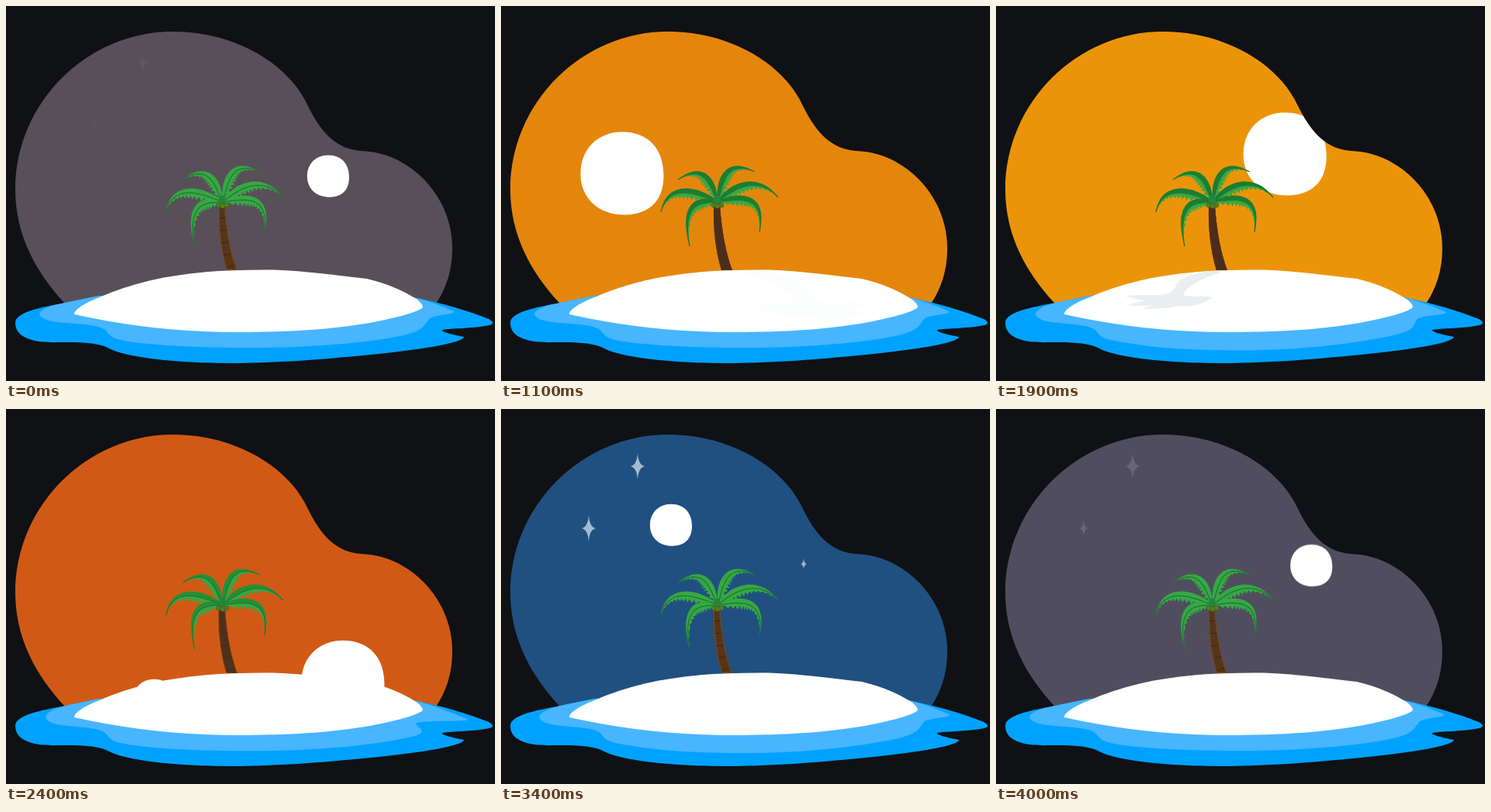
An HTML page for the animation above (4100 ms loop, 630 by 484 pixels).

```html
<!DOCTYPE html>
<html lang="en">
<head>
<meta charset="utf-8">
<title>Island day and night</title>
<style>
  html, body { margin: 0; width: 100%; height: 100%; overflow: hidden; background: #0f1114; }
  svg { display: block; width: 630px; height: 484px; }
</style>
</head>
<body>
<svg viewBox="0 0 630 484">
  <defs>
    <path id="blob" d="M76 384C30 335 12 285 12 237C12 125 104 33 215 33C290 33 357 70 385 121C400 152 418 184 457 187C522 189 575 246 575 313C575 341 567 365 554 384Z"/>
    <path id="sea" d="M12 409C12 395 45 389 76 383Q100 378 120 374L300 360L525 376C560 383 595 393 622 404Q634 411 617 413C600 416 575 416 562 418Q560 421 590 427C589 436 520 445 470 450C400 457 340 461 290 461C230 461 160 455 135 443C120 434 95 434 70 434C45 435 12 432 12 409Z"/>
    <path id="disc" d="M-1-53.5C35-54 53.5-30 53.5 2C54 38 32 53 4 53.5C-32 54-54 30-53.5 0C-53-33-30-53-1-53.5Z"/>
    <path id="star" d="M0-17Q1-2 9 0Q1 2 0 17Q-1 2-9 0Q-1-2 0-17Z"/>
    <path id="trunk" d="M274 258Q273 305 284 341H298Q286 310 282 258Z"/>
    <clipPath id="inSky"><use href="#blob"/></clipPath>
    <clipPath id="inSea"><use href="#sea"/></clipPath>
    <clipPath id="inTrunk"><use href="#trunk"/></clipPath>
    <clipPath id="inSand"><use href="#sand"/></clipPath>
  </defs>
  <use href="#blob" id="sky"/>
  <g id="stars" fill="#d9e6ee">
    <use href="#star" x="176" y="74"/><use href="#star" x="113" y="154"/><use href="#star" x="390" y="200"/>
  </g>
  <g clip-path="url(#inSky)" fill="#fff">
    <use href="#disc" id="sun"/>
    <use href="#disc" id="moon"/>
  </g>
  <use href="#trunk" fill="#563519"/>
  <g clip-path="url(#inTrunk)" fill="none">
    <path id="rings" stroke="#3d2512"/>
    <use href="#trunk" stroke="#7a4c1c" stroke-width="2"/>
  </g>
  <use href="#trunk" fill="#4a2c1c" id="dayTrunk"/>
  <path id="leaves" fill="#36a844"/>
  <path id="ribs" fill="none" stroke="#1c7832" stroke-width="1.3"/>
  <path id="shade" fill="#1e7c30"/>
  <ellipse cx="278.5" cy="251" rx="4.5" ry="7" fill="#24863a"/>
  <g fill="#557f1e" stroke="#375a18" stroke-width=".6">
    <circle cx="274" cy="257" r="3"/><circle cx="284" cy="257" r="3"/><circle cx="279" cy="258" r="3.3"/>
  </g>
  <use href="#sea" fill="#00a2ff"/>
  <path id="shallows" fill="#48b5ff" clip-path="url(#inSea)"/>
  <path id="sand" fill="#fff" d="M88 398C87 393 100 384 118 377C190 344 270 340 345 340.5C385 342 430 348 465 352C495 359 518 371 530 379Q536 384 537 388C537 391 525 396 505 401C440 418 360 421 298 421C230 421 160 414 88 398Z"/>
  <g clip-path="url(#inSand)">
    <path id="shadow" fill="#eaeef0" d="M0 0C-26 2-48 8-54 18C-58 28-64 33-80 33Q-104 32-120 34Q-104 39-92 40Q-110 43-117 46Q-98 48-84 46Q-92 49-96 51Q-66 51-52 47C-36 49-20 45-9 36C-23 33-34 36-46 33C-45 25-24 10 0 4Z"/>
  </g>
</svg>
<script>
const LOOP = 4100, STEP = 100;
const CYCLE = 4050, NOON = 1560; // length of a full day and its brightest moment
const $ = id => document.getElementById(id);
const set = (id, attrs) => Object.entries(attrs).forEach(([k, v]) => $(id).setAttribute(k, v));
const mix = (a, b, k) => a + (b - a) * k;
const clamp = (v, lo = 0, hi = 1) => Math.min(hi, Math.max(lo, v));
const wrap = (v, from) => ((v - from) % CYCLE + CYCLE) % CYCLE + from;

// Palm: a frond is an arch from the crown to its tip; lower tips bulge outwards more
const crown = [279, 252];
const tips = [[228, 224], [327, 214], [206, 266], [357, 247], [243, 310], [333, 292]];

function frond([tx, ty]) {
  const [cx, cy] = crown, dx = tx - cx, dy = ty - cy;
  const spine = [
    crown,
    [cx + dx * (0.27 + 0.008 * dy), cy - 26 + 0.3 * dy],
    [cx + dx * (0.77 + 0.011 * dy), cy - 33 + 0.62 * dy],
    [tx, ty]
  ];
  const bezier = (p, u, j) => p.length === 1 ? p[0][j]
    : mix(bezier(p.slice(0, -1), u, j), bezier(p.slice(1), u, j), u);
  // Point beside the spine, at a share of the frond's width there
  return (u, share) => {
    const x = bezier(spine, u, 0), y = bezier(spine, u, 1), e = 0.001;
    const sx = bezier(spine, u + e, 0) - x, sy = bezier(spine, u + e, 1) - y;
    const w = Math.sign(dx) * share * 13 * Math.sin(Math.PI * u ** 0.65) / Math.hypot(sx, sy);
    return [x - sy * w, y + sx * w];
  };
}

const fronds = tips.map(frond);
const line = pts => 'M' + pts.map(p => p.map(v => v.toFixed(1)).join(' ')).join('L');
const edge = (at, n, share) => Array.from({ length: n + 1 }, (_, i) => at(i / n, share(i)));
const leaf = share => fronds.map(at =>
  line([...edge(at, 24, () => -0.06), ...edge(at, 26, share).reverse()]) + 'Z').join('');

set('leaves', { d: leaf(i => i % 2 ? 1.05 : 0.68) });
set('shade', { d: leaf(() => 0.42) });
set('ribs', { d: fronds.map(at => line(edge(at, 20, () => 0.4))).join('') });
set('rings', { d: Array.from({ length: 5 }, (_, i) => `M268 ${272 + 16 * i}q12 5 32-4`).join('') });

// Sky colours by time away from noon
const skies = [
  [0, [255, 187, 1]], [840, [208, 90, 21]], [1600, [82, 78, 92]], [1890, [22, 80, 136]]
];
function skyColor(away) {
  const i = Math.max(1, skies.findIndex(s => s[0] >= away));
  const last = away > skies[skies.length - 1][0] ? skies.length - 1 : i;
  const [t0, a] = skies[last - 1], [t1, b] = skies[last];
  const k = clamp((away - t0) / (t1 - t0));
  return `rgb(${a.map((v, j) => Math.round(mix(v, b[j], k)))})`;
}

// Steadily quickening swing; angle in degrees from the top
function orbit(id, v, [angle, speed, gain], [cx, cy, r], size) {
  const a = clamp(angle + speed * v + gain * v * v, -180, 180) * Math.PI / 180;
  set(id, { transform: `translate(${cx + r * Math.sin(a)} ${cy - r * Math.cos(a)}) scale(${size})` });
}

// Light water: the left shore shrinks and a tongue reaches out on the right
function shallows(t) {
  const swing = Math.max(0, Math.cos((t - 2560) / CYCLE * 2 * Math.PI));
  const inset = clamp(3 * swing), reach = swing ** 3;
  const left = 43 + 8 * inset, low = 441 + 4 * (inset - reach);
  const tipX = 577 + 20 * reach, tipY = 394 + 7 * reach;
  const bayX = 546 - 20 * reach, bayY = 403 + 3 * reach;
  return `M118 374C80 381 ${left} 388 ${left} 398C${left + 4} 411 92 408 115 413
    C142 419 118 428 165 434Q220 ${low} 310 ${low}C400 ${low} 470 434 512 425
    C${540 + 14 * reach} 418 ${538 - 10 * reach} 412 ${bayX} ${bayY}
    C${bayX + 10} ${bayY - 5} ${tipX + 4} ${tipY + 4} ${tipX} ${tipY}Q552 383 527 376Z`;
}

function render(t) {
  const away = Math.abs(wrap(t - NOON, -CYCLE / 2));
  set('sky', { fill: skyColor(away) });
  orbit('sun', wrap(t, 0) - 1100, [-49.5, 0.0929, 1.8e-5], [277.5, 319.8, 159.8], 1);
  orbit('moon', wrap(t, 2000) - 3000, [-77.6, 0.1136, 2.35e-5], [285.6, 273, 140], 0.505);

  set('stars', { opacity: 0.72 * clamp((away - 1540) / 300) });
  [...$('stars').children].forEach((star, i) => {
    const x = star.getAttribute('x'), y = star.getAttribute('y');
    const s = (i < 2 ? 1 : 0.42) * clamp((away - 1440 - 70 * i) / 170);
    star.setAttribute('transform', `translate(${x} ${y}) scale(${s}) translate(${-x} ${-y})`);
  });

  const day = clamp((1260 - away) / 700);
  set('dayTrunk', { opacity: 0.85 * day });
  set('shade', { opacity: day });

  const lean = (t - NOON) / 335;
  set('shadow', {
    opacity: clamp(1.5 * (1 - Math.abs(t - 1730) / 700)),
    transform: `translate(${300 - 12 * lean} 341) scale(${lean} ${1.1 - 0.12 * lean})`
  });
  set('shallows', { d: shallows(t) });
}

const start = performance.now();
function tick() {
  const t = (performance.now() - start) % LOOP;
  render(Math.floor(t / STEP) * STEP);
  requestAnimationFrame(tick);
}
tick();
</script>
</body>
</html>
```
